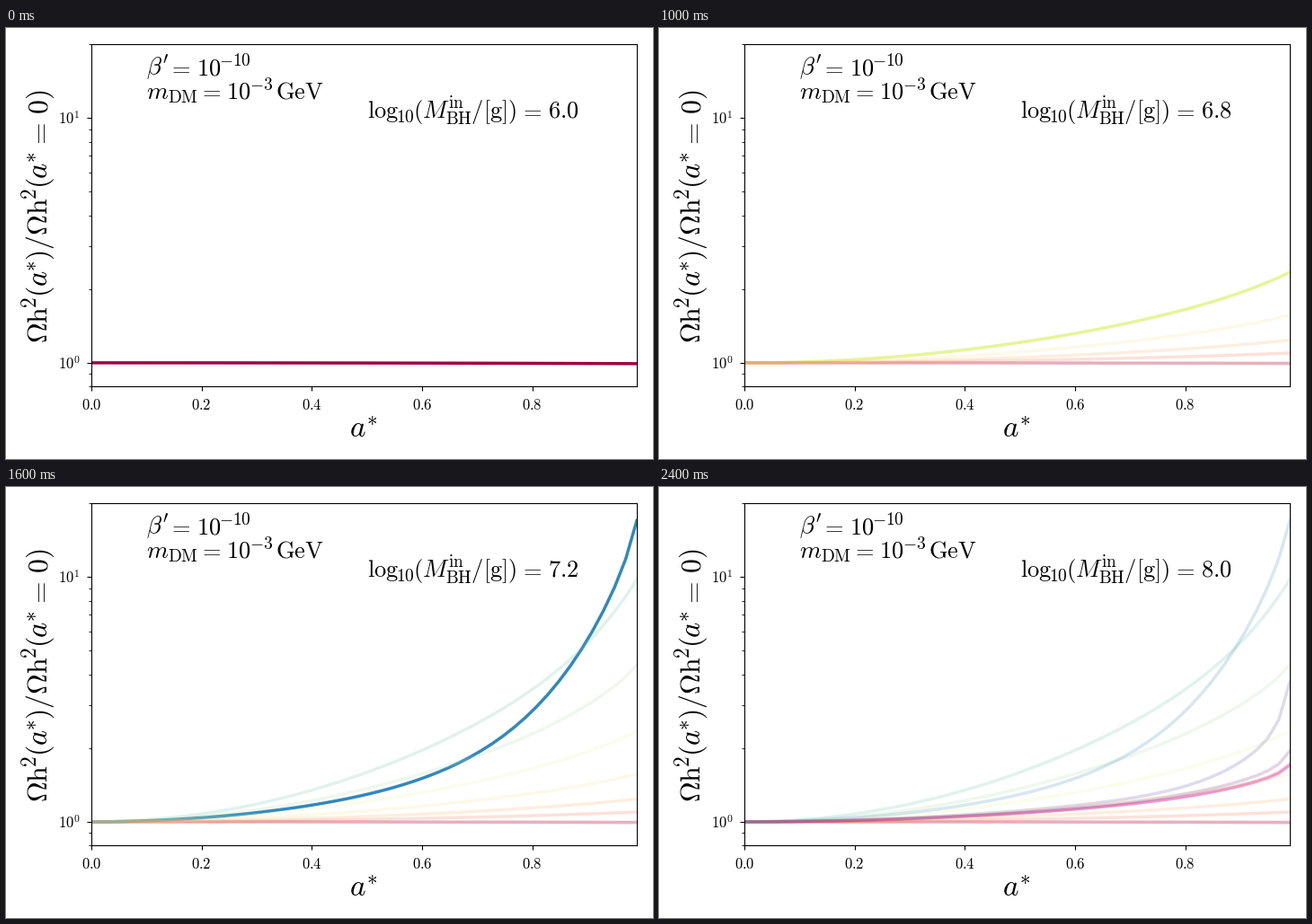
A matplotlib script for the animation above (2.6 s loop, 720 px wide and 480 px high).

```python
import math

import numpy as np
import matplotlib.pyplot as plt
from matplotlib.animation import FuncAnimation
from matplotlib.ticker import NullFormatter

plt.rcParams["mathtext.fontset"] = "cm"

W, H, DPI = 720, 480, 100
SPIN_MAX = 0.99
FADED = 0.2

# log10 mass, colour, end height in decades, steep share, steep power, tip share
CURVES = [
    (6.0, "#9e0142", -0.0035, 0.10, 8, 0.00),
    (6.2, "#d53e4f", -0.0010, 0.10, 8, 0.00),
    (6.5, "#f46d43", 0.040, 0.05, 10, 0.00),
    (6.6, "#fdae61", 0.093, 0.08, 10, 0.00),
    (6.7, "#fee08b", 0.195, 0.11, 10, 0.00),
    (6.8, "#e6f598", 0.370, 0.12, 10, 0.00),
    (6.9, "#abdda4", 0.641, 0.15, 10, 0.02),
    (7.0, "#66c2a5", 0.989, 0.20, 10, 0.00),
    (7.2, "#3288bd", 1.230, 0.62, 6.6, 0.05),
    (7.4, "#5e4fa2", 0.571, 0.44, 10, 0.25),
    (7.6, "#762a83", 0.289, 0.33, 8, 0.16),
    (7.8, "#c51b7d", 0.236, 0.31, 8, 0.10),
    (8.0, "#f1b6da", 0.230, 0.31, 8, 0.10),
]

fig = plt.figure(figsize=(W / DPI, H / DPI), dpi=DPI, facecolor="white")
ax = fig.add_axes([95 / W, 80.7 / H, 607 / W, 381.3 / H])
ax.set_yscale("log")
ax.set_xlim(0, SPIN_MAX)
ax.set_ylim(0.8, 20)
ticks = [0, 0.2, 0.4, 0.6, 0.8]
ax.set_xticks(ticks, [f"${t:.1f}$" for t in ticks])
ax.set_yticks([1, 10], ["$10^{0}$", "$10^{1}$"])
ax.yaxis.set_minor_formatter(NullFormatter())
ax.tick_params(axis="x", labelsize=12, pad=4.6)
ax.tick_params(axis="y", labelsize=12, pad=5.6)


def put(x, y, tex, size, **style):
    """Place math text with its baseline at pixel (x, y) from the top left."""
    return fig.text(x / W, 1 - y / H, f"${tex}$", fontsize=size, va="baseline",
                    rotation_mode="anchor", **style)


def formula(x, y, parts, size=20, angle=0):
    """Set parts given as (offset in em, rise in em, text, relative size)."""
    em = size * DPI / 72
    c, s = math.cos(math.radians(angle)), math.sin(math.radians(angle))
    return [put(x + em * (dx * c - rise * s), y - em * (dx * s + rise * c),
                tex, size * scale, rotation=angle)
            for dx, rise, tex, scale in parts]


MAIN, ITALIC, SCRIPT = 0.95, 0.98, 0.7

formula(156.3, 52.1, [
    (0, 0, r"\beta'", ITALIC),
    (0.86, 0, "=", MAIN),
    (2.00, 0, "10", MAIN),
    (2.92, 0.363, "{-10}", SCRIPT),
])
formula(156.3, 78.6, [
    (0, 0, "m", ITALIC),
    (0.854, -0.15, r"\mathrm{DM}", SCRIPT),
    (2.06, 0, "=", MAIN),
    (3.20, 0, "10", MAIN),
    (4.12, 0.363, "{-3}", SCRIPT),
    (5.17, 0, r"\mathrm{GeV}", MAIN),
])
mass_text = formula(401.6, 99.8, [
    (0, 0, r"\mathrm{log}", MAIN),
    (1.17, -0.2, "10", SCRIPT),
    (1.86, 0, "(", MAIN),
    (2.21, 0, "M", ITALIC),
    (3.27, 0.40, r"\mathrm{in}", SCRIPT),
    (3.16, -0.25, r"\mathrm{BH}", SCRIPT),
    (4.17, 0, "/", MAIN),
    (4.66, 0, r"[\mathrm{g}]", MAIN),
    (5.64, 0, ")", MAIN),
    (6.10, 0, "=", MAIN),
    (7.24, 0, "6.0", MAIN),
])[-1]

put(397.5, 456.5, "a^{*}", 24, ha="center")


def relic_density(start):
    return [
        (start, 0, r"\Omega", MAIN),
        (start + 0.67, 0, r"\mathrm{h}", MAIN),
        (start + 1.18, 0.363, "2", SCRIPT),
        (start + 1.54, 0, "(", MAIN),
        (start + 1.89, 0, "a", ITALIC),
        (start + 2.41, 0.363, "{*}", SCRIPT),
    ]


formula(46, 351, [
    *relic_density(0),
    (2.77, 0, ")", MAIN),
    (3.12, 0, "/", MAIN),
    *relic_density(3.61),
    (6.49, 0, "=", MAIN),
    (7.65, 0, "0", MAIN),
    (8.12, 0, ")", MAIN),
], size=24, angle=90)

spin = np.linspace(0, SPIN_MAX, 50)


def abundance(height, steep, power, tip):
    u = spin / SPIN_MAX
    shape = (1 - steep - tip) * u**2 + steep * u**power + tip * u**60
    return 10 ** (height * shape)


lines = [ax.plot(spin, abundance(*shape), color=color, lw=2.5)[0]
         for _, color, *shape in CURVES]


def update(frame):
    # The current curve lies beneath the faded earlier ones.
    for i, line in enumerate(lines):
        line.set_visible(i <= frame)
        line.set_alpha(1 if i == frame else FADED)
        line.set_zorder(1.5 if i == frame else 2)
    mass_text.set_text(f"${CURVES[frame][0]:.1f}$")
    return [*lines, mass_text]


anim = FuncAnimation(fig, update, frames=len(CURVES), interval=200,
                     repeat=True, repeat_delay=0)
plt.show()
```
